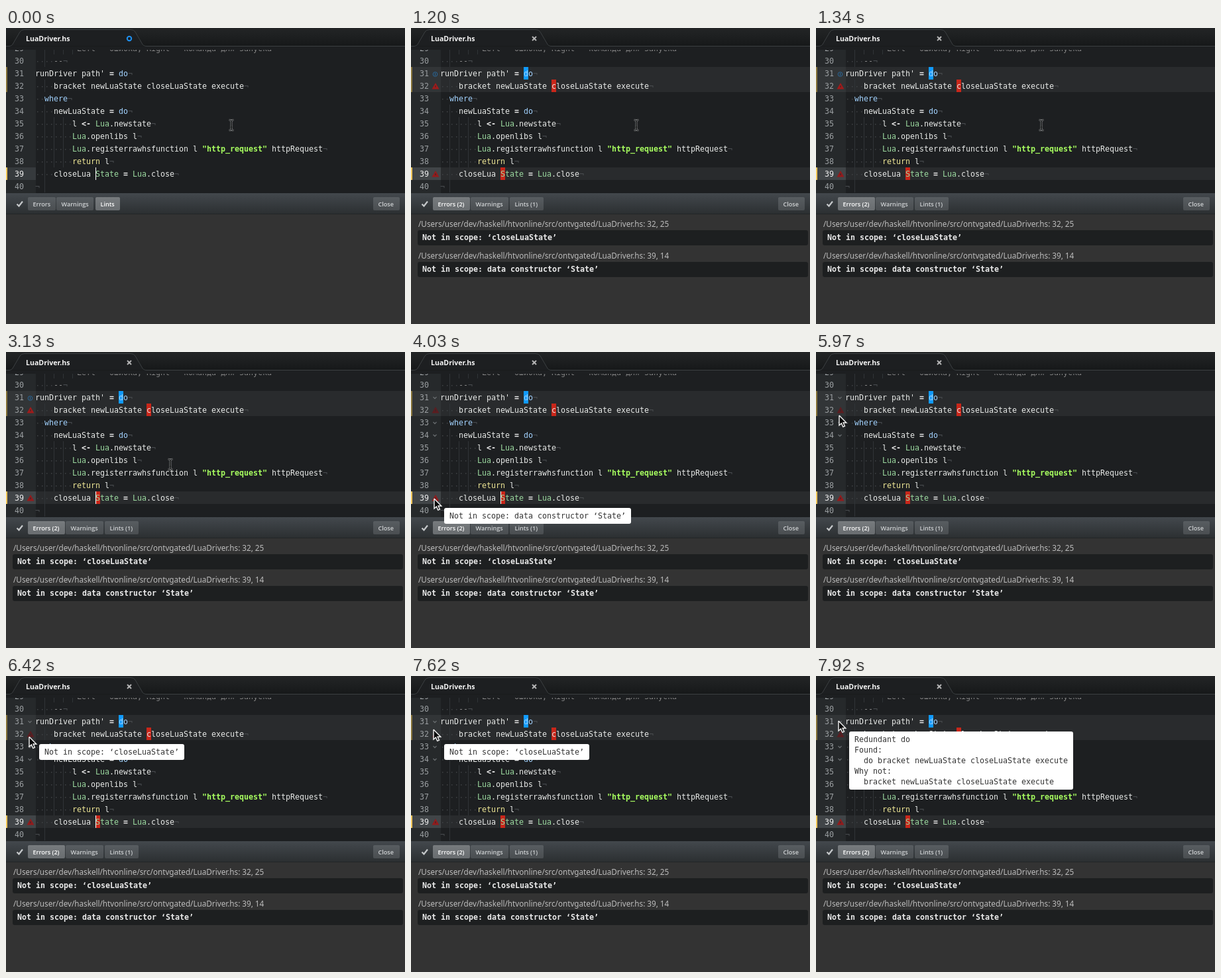
These frames come from a looping animation (602 px wide and 448 px high, 8 s). An HTML page with a canvas:

```html
<!DOCTYPE html>
<html lang="en">
<head>
<meta charset="utf-8">
<title>Haskell editor</title>
<style>
html, body { margin: 0; width: 100%; height: 100%; overflow: hidden; background: #333; }
canvas { display: block; }
</style>
</head>
<body>
<canvas id="stage" width="602" height="448"></canvas>
<script>
const ctx = document.getElementById('stage').getContext('2d');
const LOOP = 8000, CHAR = 7, ROW = 19, LEFT = 44, FIRST = 29;
const MONO = '11.63px "DejaVu Sans Mono", monospace';
const UI = '"Noto Sans", "Open Sans", sans-serif';

const code = [
  '         Left - ошибка, Right - команда для запуска',
  '    --',
  "runDriver path' = do",
  '    bracket newLuaState closeLuaState execute',
  '  where',
  '    newLuaState = do',
  '        l <- Lua.newstate',
  '        Lua.openlibs l',
  '        Lua.registerrawhsfunction l "http_request" httpRequest',
  '        return l',
  '    closeLua State = Lua.close',
  ''
];

const tips = {
  39: ['Not in scope: data constructor ‘State’'],
  32: ['Not in scope: ‘closeLuaState’'],
  31: ['Redundant do', 'Found:', '  do bracket newLuaState closeLuaState execute',
       'Why not:', '  bracket newLuaState closeLuaState execute']
};
const path = '/Users/user/dev/haskell/htvonline/src/ontvgated/LuaDriver.hs: ';

// Timelines: the latest entry whose time has passed applies.
const tipTimes = [[0, 0], [4030, 39], [5230, 0], [6120, 32], [7770, 0], [7920, 31]];
const mouseTimes = [
  [0, 340, 147], [2390, 338, 147], [2540, 334, 148], [2830, 320, 151], [2980, 290, 160],
  [3130, 248, 170], [3280, 190, 187], [3430, 130, 205], [3580, 80, 218], [3730, 57, 221],
  [3880, 36, 222], [4030, 35, 222], [5230, 35, 214], [5380, 35, 193], [5530, 35, 165],
  [5670, 35, 138], [5820, 35, 113], [5970, 35, 96], [6120, 35, 92], [7470, 35, 88],
  [7620, 34, 81], [7770, 34, 74], [7920, 34, 68]
];
const caretToggles = [450, 750, 1190, 1640, 1940, 2390, 2830, 3130, 3580, 4030,
  4330, 4780, 5230, 5670, 5970, 6420, 6870, 7170, 7620];

const current = (list, t) => list.filter(entry => entry[0] <= t).pop();
const rowTop = n => 59 + (n - 31) * ROW;

function rect(x, y, w, h, fill) {
  ctx.fillStyle = fill;
  ctx.fillRect(x, y, w, h);
}

function box(x, y, w, h, radius, fill) {
  ctx.fillStyle = fill;
  ctx.beginPath();
  ctx.roundRect(x, y, w, h, radius);
  ctx.fill();
}

function text(str, x, y, color, font) {
  ctx.font = font;
  ctx.fillStyle = color;
  ctx.fillText(str, x, y);
}

function fillShape(points, fill) {
  ctx.beginPath();
  points.forEach(([x, y]) => ctx.lineTo(x, y));
  ctx.closePath();
  ctx.fillStyle = fill;
  ctx.fill();
}

function line(points, color, width) {
  ctx.beginPath();
  points.forEach(([x, y]) => ctx.lineTo(x, y));
  ctx.strokeStyle = color;
  ctx.lineWidth = width;
  ctx.stroke();
}

function ring(x, y, r, color, width) {
  ctx.beginPath();
  ctx.arc(x, y, r, 0, Math.PI * 2);
  ctx.strokeStyle = color;
  ctx.lineWidth = width;
  ctx.stroke();
}

function vertical(y0, y1, from, to) {
  const g = ctx.createLinearGradient(0, y0, 0, y1);
  g.addColorStop(0, from);
  g.addColorStop(1, to);
  return g;
}

function tokenStyle(token) {
  if (token[0] === '"') return ['#a8ff60', 'bold '];
  if (token === 'do' || token === 'where') return ['#a3d3ff', ''];
  if (token === 'return') return ['#f0e896', ''];
  if (token === '<-' || token === '=') return ['#ededed', 'bold '];
  if (/^[A-Z]/.test(token)) return ['#9cdaa0', ''];
  return ['#e8eae8', ''];
}

function drawLine(source, n) {
  const y = rowTop(n), base = y + 14;
  const indent = source.search(/\S|$/);
  for (let col = 0; col < indent; col++) {
    rect(LEFT + col * CHAR + 3, y + 10, 1.5, 1.5, '#404346');
    if (col && col % 2 === 0) rect(LEFT + col * CHAR, y, 1, ROW, '#303437');
  }
  for (const m of source.matchAll(/"[^"]*"|[\wа-я']+|<-|--|\S/g)) {
    const [color, weight] = n < 31 ? ['#858585', ''] : tokenStyle(m[0]);
    text(m[0], LEFT + m.index * CHAR, base, color, weight + MONO);
  }
  text('¬', LEFT + source.length * CHAR, base, '#4b4e51', MONO);
}

function triangle(n, color) {
  const y = rowTop(n) + 10;
  fillShape([[37, y - 5], [42.5, y + 4.5], [31.5, y + 4.5]], color);
  rect(36.5, y - 1, 1, 3, '#292c2f');
}

function drawGutter(checked, linted, hovered) {
  for (let n = 29; n <= 40; n++) {
    text(n, 13, rowTop(n) + 14, n === 39 ? '#f0f0f0' : '#9a9ea1', MONO);
  }
  rect(0, rowTop(31), 2, ROW * 2, '#88753c');
  rect(0, rowTop(39), 2, ROW, '#ffc75a');
  if (hovered) {
    for (const n of [31, 33, 34]) {
      const y = rowTop(n) + 10;
      line([[33.5, y - 1], [36, y + 1.5], [38.5, y - 1]], '#686c6f', 1.3);
    }
  } else if (linted) {
    ring(36.5, rowTop(31) + 11, 3.3, '#28689c', 1);
    rect(36, rowTop(31) + 9, 1, 4, '#28689c');
  }
  if (checked) {
    triangle(32, hovered ? '#5c1d20' : '#a01b1b');
    triangle(39, '#931b1c');
  }
}

function drawEditor(t, checked, linted, hovered) {
  ctx.save();
  ctx.beginPath();
  ctx.rect(0, 33, 602, 217);
  ctx.clip();
  rect(0, 33, 602, 217, '#1d1f21');
  rect(0, 33, LEFT + 1, 217, '#26292b');
  rect(0, rowTop(39), LEFT + 1, ROW, '#363a3d');
  if (checked) {
    for (const n of [31, 32, 39]) rect(0, rowTop(n), 602, ROW, 'rgba(255,255,255,.055)');
    rect(LEFT + 24 * CHAR, rowTop(32), CHAR, ROW, '#c9261a');
    rect(LEFT + 13 * CHAR, rowTop(39), CHAR, ROW, '#c9261a');
  }
  if (linted) rect(LEFT + 18 * CHAR, rowTop(31), CHAR, ROW, '#119aff');
  code.forEach((source, i) => drawLine(source, FIRST + i));
  rect(58, rowTop(40), 1, ROW, '#303437');
  drawGutter(checked, linted, hovered);
  const toggles = caretToggles.filter(time => time <= t).length;
  if (toggles % 2 === 0) rect(135, rowTop(39), 1, ROW, '#fff');
  ctx.restore();
}

function drawTabs(saved) {
  rect(0, 0, 602, 33, '#1d1f21');
  rect(0, 0, 602, 28, vertical(0, 28, '#232526', '#161819'));
  ctx.beginPath();
  ctx.moveTo(-1, 27.5);
  ctx.lineTo(4, 27.5);
  ctx.quadraticCurveTo(9, 27.5, 11, 23);
  ctx.lineTo(21, 6);
  ctx.quadraticCurveTo(23, 2.5, 28, 2.5);
  ctx.lineTo(188, 2.5);
  ctx.quadraticCurveTo(193, 2.5, 195, 6);
  ctx.lineTo(205, 23);
  ctx.quadraticCurveTo(207, 27.5, 212, 27.5);
  ctx.lineTo(603, 27.5);
  ctx.fillStyle = '#1d1f21';
  ctx.fill();
  ctx.strokeStyle = '#3c4042';
  ctx.lineWidth = 1;
  ctx.stroke();
  text('LuaDriver.hs', 30, 20, '#f4f4f4', 'bold 10.6px ' + UI);
  if (saved) {
    line([[183, 13], [189, 19]], '#b5b5b5', 2);
    line([[189, 13], [183, 19]], '#b5b5b5', 2);
  } else {
    ring(186, 16, 3.2, '#1e90f0', 2);
  }
}

function button(label, x, w, active) {
  box(x, 256, w, 20, 2, active ? vertical(256, 276, '#777b7e', '#696d70')
                               : vertical(256, 276, '#585d61', '#4a4e51'));
  text(label, x + 7.5, 269.5, active ? '#fff' : '#d0d3d5', '600 9.1px "Open Sans", sans-serif');
}

function drawError(y, position, message) {
  text(path + position, 11, y, '#bdbdbd', '11.7px ' + UI);
  box(10, y + 5, 589, 23, 3, '#1d1f20');
  text(message, 17, y + 20, '#eaeaea', 'bold ' + MONO);
}

function drawPanel(t, checked, linted) {
  rect(0, 250, 602, 198, '#333');
  rect(0, 250, 602, 32, vertical(250, 282, '#43484d', '#2b2f31'));
  rect(0, 281, 602, 1, '#222526');
  if (t < 600 || t >= 1190) {
    line([[16.5, 266.5], [19.5, 269.5], [25, 262.5]], '#c5c8ca', 2.2);
  }
  if (checked) {
    button('Errors (2)', 33, 56, true);
    button('Warnings', 90, 57, false);
    button(linted ? 'Lints (1)' : 'Lints', 149, linted ? 51 : 37, false);
    drawError(301, '32, 25', tips[32][0]);
    drawError(349, '39, 14', tips[39][0]);
  } else {
    button('Errors', 33, 42, false);
    button('Warnings', 76, 56, false);
    button('Lints', 135, 37, true);
  }
  button('Close', 554, 40, false);
}

function drawTip(n) {
  const lines = tips[n], y = rowTop(n) + 25;
  const columns = Math.max(...lines.map(row => row.length));
  box(50, y, columns * CHAR + 16, lines.length * 16 + 8, 3, '#fff');
  lines.forEach((row, i) => text(row, 58, y + 16 + i * 16, '#333', MONO));
}

function drawBeam(x, y) {
  const half = side => [[x + side * 3.5, y - 8], [x + side, y - 7.5], [x, y - 6],
    [x, y + 6], [x + side, y + 7.5], [x + side * 3.5, y + 8]];
  for (const [color, width] of [['#7c7e7f', 2.6], ['#151617', 1]]) {
    line(half(-1), color, width);
    line(half(1), color, width);
    line([[x - 2, y + 3], [x + 2, y + 3]], color, width);
  }
}

function drawArrow(x, y) {
  const outline = [[0, 0], [0, 15], [3.4, 12], [5.8, 17.3], [8.4, 16.2], [6.1, 11], [10.8, 11], [0, 0]]
    .map(([dx, dy]) => [x + dx, y + dy]);
  fillShape(outline, '#080808');
  line(outline, '#f4f4f4', 1.4);
}

function draw(t) {
  const checked = t >= 1050, linted = t >= 1190, hovered = t >= 3880;
  drawEditor(t, checked, linted, hovered);
  drawTabs(t >= 450);
  drawPanel(t, checked, linted);
  const tip = current(tipTimes, t)[1];
  if (tip) drawTip(tip);
  const [, x, y] = current(mouseTimes, t);
  (hovered ? drawArrow : drawBeam)(x, y);
}

const start = performance.now();
function tick() {
  draw((performance.now() - start) % LOOP);
  requestAnimationFrame(tick);
}
tick();
</script>
</body>
</html>
```
